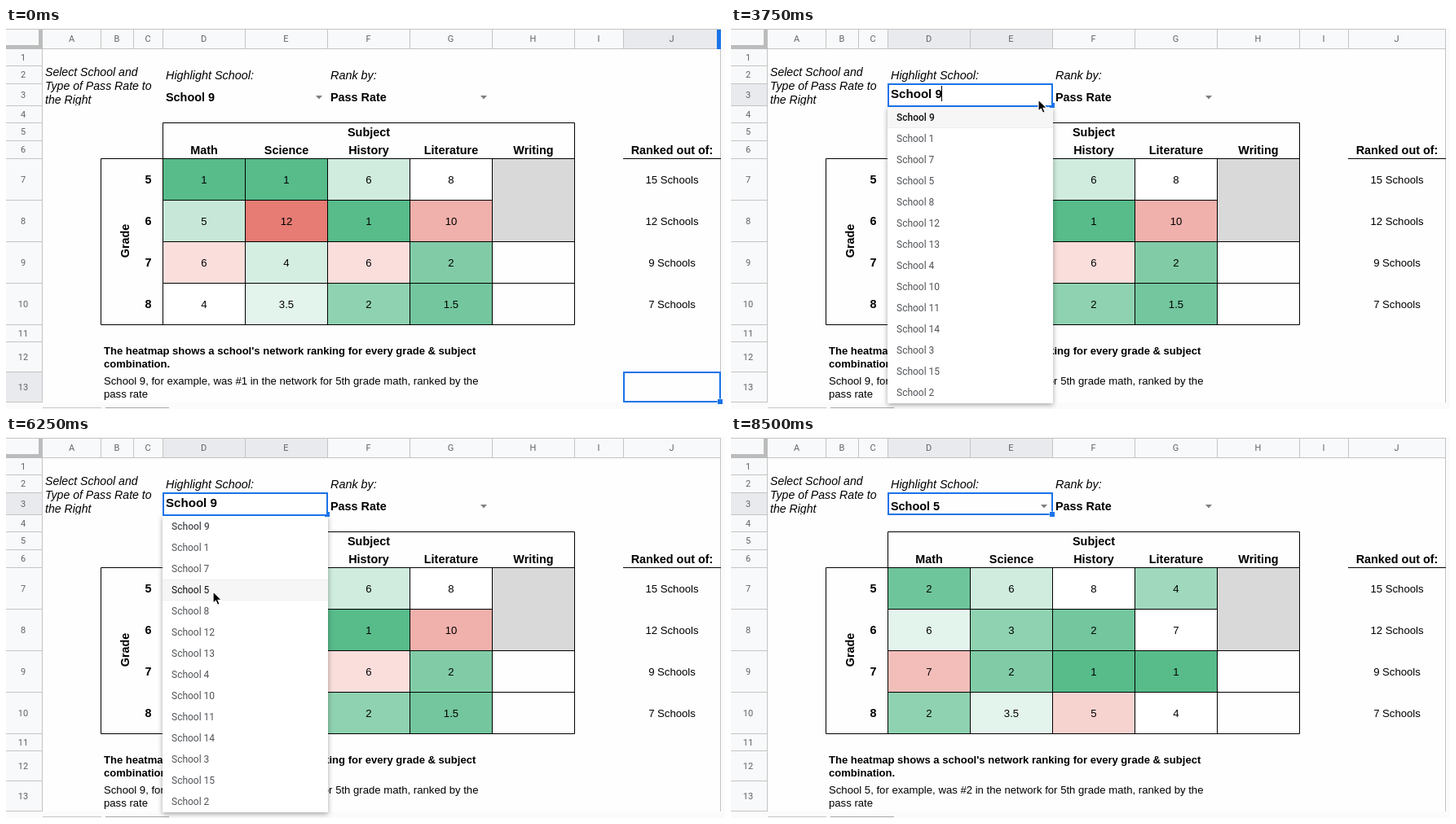
Write an HTML page that moves like this. It is 882 by 468 pixels and loops after 9000 ms.

```html
<!DOCTYPE html>
<html lang="en">
<head>
<meta charset="utf-8">
<title>School ranking heatmap</title>
<style>
  html, body { margin: 0; width: 100%; height: 100%; overflow: hidden; background: #fff; }
  svg { display: block; width: 882px; height: 468px; }
  text { font-family: "Liberation Sans", Arial, sans-serif; font-size: 13.15px; fill: #000; white-space: pre; }
  .b { font-weight: 700; font-size: 14.4px; }
  .i { font-style: italic; font-size: 14.4px; }
  .hint { font-style: italic; font-size: 14.1px; }
  .mid { text-anchor: middle; }
  .strong { font-weight: 700; font-size: 13.05px; }
  .edit { font-weight: 700; font-size: 15.1px; }
  .head { font: 11px Roboto, sans-serif; fill: #5f6368; text-anchor: middle; }
  .item { font: 12px Roboto, sans-serif; fill: #505357; }
  .first { font-weight: 500; }
  .hot { fill: #111; }
  .shadow { filter: drop-shadow(0 2px 3px rgba(0, 0, 0, .35)); }
</style>
</head>
<body>
<svg id="stage" viewBox="0 0 882 468"></svg>
<script>
const LOOP = 9000, STEP = 250, BLUE = '#1a73e8';
const OPEN = 3750, PICK = 6750, RECALC = 7250, LEAVE = 8500;
const CELL = { w: 101, h: 51, x: 192, y: 160 };
const ITEM = 26, MENU_TOP = 97;
const stage = document.getElementById('stage');

const times = (n, v) => Array(n).fill(v);
const edges = (from, sizes) => sizes.reduce((list, size) => [...list, list.at(-1) + size], [from]);
const cols = edges(45, [71, 40, 36, ...times(5, CELL.w), 60, 119]);
const rows = edges(26, [20, 22, 27, 21, 22, 22, ...times(4, CELL.h), 21, 37, 37]);

const subjects = ['Math', 'Science', 'History', 'Literature', 'Writing'];
const schools = [15, 12, 9, 7];
const parse = s => s.split(' / ').map(line => line.split(' '));
const ranks = {
  9: parse('1 1 6 8 / 5 12 1 10 / 6 4 6 2 / 4 3.5 2 1.5'),
  5: parse('2 6 8 4 / 6 3 2 7 / 7 2 1 1 / 2 3.5 5 4')
};
const menu = '9 1 7 5 8 12 13 4 10 11 14 3 15 2'.split(' ');

// Pointer stops: ms, x, y. It slows down into each one.
const stops = [
  [500, 505, 71], [1000, 363, 234], [1250, 378, 229], [1500, 335, 135],
  [2000, 377, 86], [OPEN, 376, 87], [4250, 344, 128], [4500, 300, 174],
  [4750, 253, 281], [5250, 253, 308], [5750, 253, 189], [8000, 253, 189], [8250, 478, 7]
];

function pointerAt(t) {
  if (t < stops[0][0] || t >= LEAVE) return null;
  const i = stops.findLastIndex(stop => stop[0] <= t);
  const [t0, x0, y0] = stops[i], [t1, x1, y1] = stops[i + 1] ?? [LEAVE, x0, y0];
  const k = 1 - (1 - (t - t0) / (t1 - t0)) ** 1.6;
  return { x: Math.round(x0 + (x1 - x0) * k), y: Math.round(y0 + (y1 - y0) * k) };
}

const rect = (x, y, w, h, fill, more = '') =>
  `<rect x="${x}" y="${y}" width="${w}" height="${h}" fill="${fill}" ${more}/>`;
const text = (x, y, s, cls = '', more = '') =>
  `<text x="${x}" y="${y}" class="${cls}" ${more}>${s}</text>`;
const path = (d, more) => `<path d="${d}" ${more}/>`;
const lines = (d, color) => path(d, `stroke="${color}" fill="none"`);
const frame = (x, y, w, h, fill) => rect(x, y, w, h, fill, `stroke="${BLUE}" stroke-width="2"`);
const triangle = x => path(`M${x} 83h8l-4 4.5z`, 'fill="#808080"');

// Green above the middle rank, red below it.
function shade(rank, n) {
  const middle = Math.floor(n / 2) + 1;
  const good = rank < middle;
  const k = good ? (rank - 1) / (middle - 1) : (n - rank) / (n - middle);
  const mix = (good ? [87, 187, 138] : [230, 124, 115]).map(c => Math.round(c + (255 - c) * k));
  return `rgb(${mix})`;
}

function headers(onCols, onRow) {
  let s = rect(0, 1, 877, 25, '#f8f9fa') + rect(0, 26, 45, 434, '#f8f9fa');
  let d = 'M0 1.5H877M0 25.5H877M44.5 2V460';
  cols.slice(0, -1).forEach((x, i) => {
    const end = cols[i + 1];
    if (onCols.includes(i)) s += rect(x, 2, end - x, 23, '#e8eaed');
    s += text((x + end) / 2, 17, 'ABCDEFGHIJ'[i], 'head');
    d += `M${end + .5} 2V25`;
  });
  rows.slice(0, -1).forEach((y, i) => {
    const end = rows[i + 1];
    if (onRow === i) s += rect(0, y, 44, end - y, '#e8eaed');
    s += text(21, (y + end) / 2 + 4, i + 1, 'head');
    d += `M0 ${end + .5}H44`;
  });
  return s + lines(d + 'M876.5 2V460', '#c4c4c4') +
    rect(0, 21, 45, 5, '#bcbcbc') + rect(40, 2, 5, 24, '#bcbcbc');
}

function heatmap(school) {
  const { w, h, x, y } = CELL;
  const center = c => x + w * c + 51;
  let s = rect(x + 4 * w, y, w, 2 * h, '#d9d9d9');
  let d = `M${x + .5} ${y}V116.5H697.5V364.5H116.5V160.5H697.5M757 160.5H877`;
  ranks[school].forEach((line, r) => {
    const top = y + h * r, base = top + 31;
    line.forEach((rank, c) => {
      s += rect(x + w * c, top, w, h, shade(+rank, schools[r])) + text(center(c), base, rank, 'mid');
    });
    s += text(174.5, base, r + 5, 'b mid') + text(817, base, schools[r] + ' Schools', 'mid');
    d += `M${x} ${top + .5}H${r === 1 ? 597 : 697}`;
  });
  subjects.forEach((name, c) => {
    s += text(center(c), 155, name, 'b mid');
    d += `M${x + w * c + .5} ${y}V364`;
  });
  return s + lines(d, '#000') +
    text(445, 133, 'Subject', 'b mid') + text(817, 155, 'Ranked out of:', 'b mid') +
    text(0, 0, 'Grade', 'b mid', 'transform="translate(150.5 261.5) rotate(-90)"');
}

function labels(cell, school) {
  const hint = ['Select School and', 'Type of Pass Rate to', 'the Right'];
  return '<clipPath id="cut"><path d="M45 26H192V95H45z"/></clipPath><g clip-path="url(#cut)">' +
    hint.map((s, i) => text(48, 59 + 17 * i, s, 'hint')).join('') + '</g>' +
    text(196, 63, 'Highlight School:', 'i') + text(398, 63, 'Rank by:', 'i') +
    text(196, 90, 'School ' + cell, 'b') + text(398, 90, 'Pass Rate', 'b') +
    triangle(380) + triangle(582) +
    text(120, 401, "The heatmap shows a school's network ranking for every grade &amp; subject", 'strong') +
    text(120, 417, 'combination.', 'strong') +
    text(120, 438, `School ${school}, for example, was #${ranks[school][0][0]} in the network for 5th grade math, ranked by the`) +
    text(120, 454, 'pass rate');
}

const selection = (x, y, w, h) => frame(x, y, w, h, 'none') +
  rect(x + w - 3.5, y + h - 3.5, 7, 7, '#fff') + rect(x + w - 3, y + h - 3, 6, 6, BLUE);

function dropdown(pointer, caret) {
  const hot = Math.max(0, Math.floor((pointer.y - MENU_TOP) / ITEM));
  let s = rect(192, MENU_TOP, 203, ITEM * menu.length, '#fff', 'class="shadow"');
  menu.forEach((n, i) => {
    const y = MENU_TOP + ITEM * i;
    if (i === hot) s += rect(192, y, 203, ITEM, '#efefef') + rect(192, y + 1, 203, ITEM - 2, '#f6f6f6');
    s += text(203, y + 17, 'School ' + n, `item ${i ? '' : 'first'} ${i === hot ? 'hot' : ''}`);
  });
  return s + rect(391, 92, 6, 6, BLUE) + frame(193, 69, 201, 27, '#fff') +
    text(196, 86, 'School 9', 'edit') + (caret ? rect(258, 71, 1, 19, '#000') : '');
}

function cursor({ x, y }) {
  // Only the upper part shows over the column header.
  const height = y < 26 ? 13 : 20;
  return `<clipPath id="tip"><path d="M0 0H14V${height}H0z"/></clipPath>` +
    `<g transform="translate(${x} ${y})" clip-path="url(#tip)">` +
    path('M1 1V15.2L4.3 12.2L6.6 17.4L9.2 16.3L7 11.3H11.6Z', 'stroke="#fff" stroke-width="1.2"') + '</g>';
}

function draw(t) {
  const pointer = pointerAt(t);
  const moved = t >= OPEN, open = moved && t < PICK;
  const caret = Math.floor((t - OPEN) / 500) % 2 === 0;
  let s = rect(0, 0, 882, 468, '#fefefe') + rect(0, 460, 882, 8, '#fbfbfb') + rect(877, 0, 5, 468, '#fbfbfb') +
    rect(45, 466, 72, 1, '#c8c8c8') + rect(122, 466, 78, 1, '#a8a8a8') +
    headers(moved ? [3, 4] : [9], moved ? 2 : 12);
  if (t < 2500) s += rect(872, 2, 5, 24, BLUE);
  const school = t < RECALC ? 9 : 5;
  s += heatmap(school) + labels(t < PICK ? 9 : 5, school);
  if (open) s += dropdown(pointer, caret);
  else s += moved ? selection(193, 69, 201, 26) : selection(758, 423, 118, 36);
  return s + (pointer ? cursor(pointer) : '');
}

let start, shown;
function tick(now) {
  start ??= now;
  const t = Math.floor((now - start) % LOOP / STEP) * STEP;
  if (t !== shown) stage.innerHTML = draw(shown = t);
  requestAnimationFrame(tick);
}
stage.innerHTML = draw(0);
requestAnimationFrame(tick);
</script>
</body>
</html>
```
